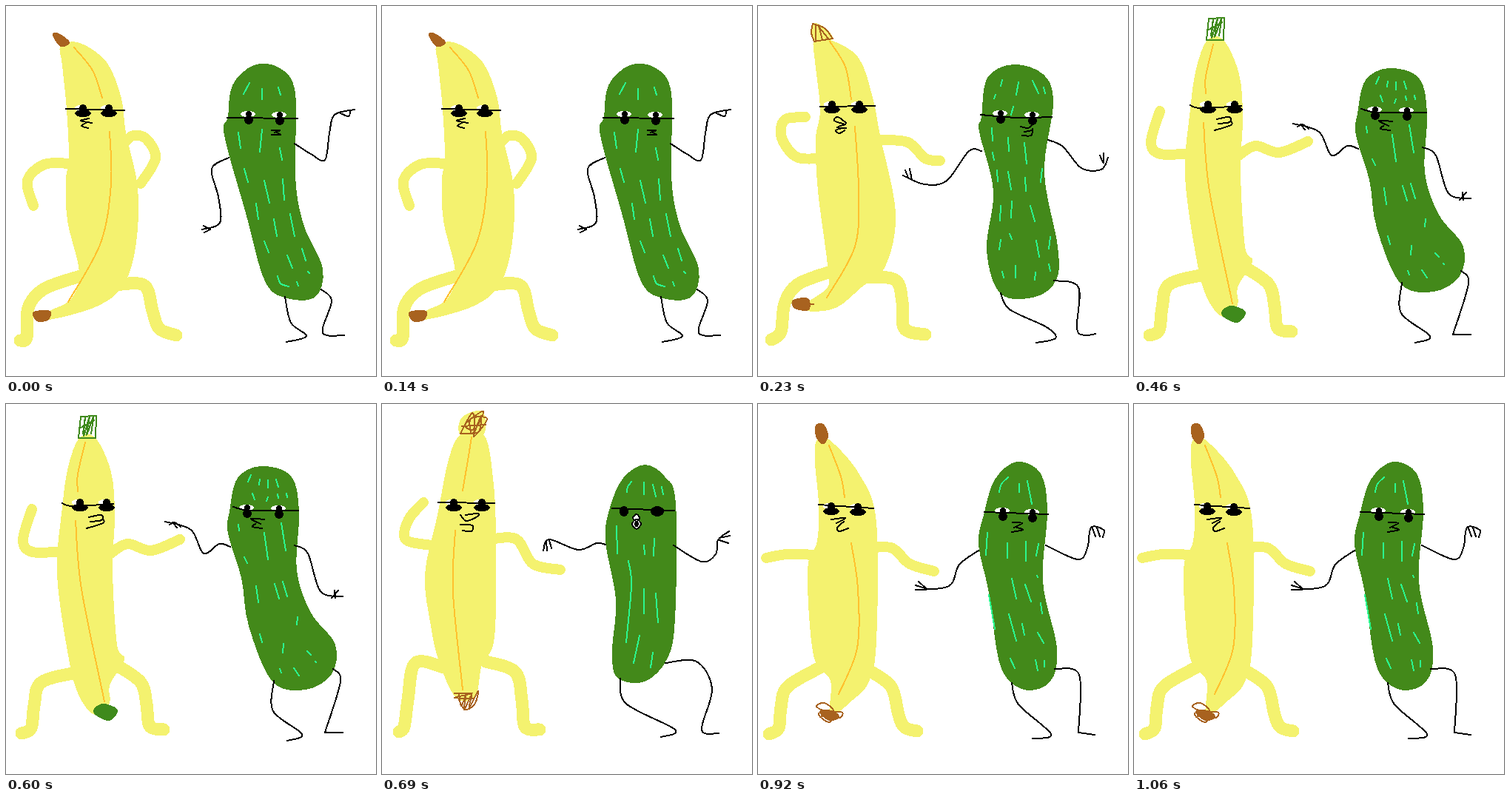
An HTML page that plays this animation: 500x500 px, repeating every 1150 ms.

```html
<!DOCTYPE html>
<html lang="en">
<head>
<meta charset="utf-8">
<title>Banana and cucumber dance</title>
<style>
html, body { margin: 0; width: 100%; height: 100%; overflow: hidden; background: #fff; }
svg { display: block; width: 100%; height: 100%; }
path { fill: none; stroke: #000; stroke-width: 2; stroke-linecap: round; stroke-linejoin: round; }
.banana { fill: #f4f26f; stroke: none; }
.arm, .leg { stroke: #f4f26f; stroke-width: 14; }
.leg { stroke-width: 17; }
.ridge { stroke: #ffc12e; }
.brown { stroke: #a8621f; }
.green { stroke: #3f8a1c; }
.brown.full { fill: #a8621f; }
.green.full { fill: #3f8a1c; }
.cuke { fill: #43891a; stroke: none; }
.seams { stroke: #2bf78e; }
.white { fill: #fff; }
.pose { visibility: hidden; animation: show 1150ms step-end infinite; animation-delay: calc(var(--i) * 230ms - 1150ms); }
@keyframes show { 0% { visibility: visible; } 20%, 100% { visibility: hidden; } }
</style>
</head>
<body>
<svg viewBox="0 0 500 500" shape-rendering="crispEdges">
<defs>
  <g id="sly">
    <ellipse class="white" cx="-4" cy="-4" rx="7" ry="4"/>
    <circle cy="-4" r="5"/>
    <ellipse cy="3" rx="11" ry="5"/>
  </g>
  <g id="cool">
    <ellipse class="white" cx="-1" cy="-6" rx="10" ry="4"/>
    <circle cy="-6" r="4"/>
    <circle cy="2" r="6"/>
  </g>
</defs>

<g class="pose">
  <path class="banana" d="M74 54 100 50 136 76 156 125 162 172 178 245 176 320 160 375 125 405 58 424 58 413 88 396 99 360 83 290 81 235 85 205 82 140 76 80Z"/>
  <path class="arm" d="M88 213 52 214 29 236 37 270"/>
  <path class="arm" d="M160 185 172 175 190 180 202 206 182 240"/>
  <path class="leg" d="M104 364 52 382 30 408 28 448 19 452"/>
  <path class="leg" d="M140 378 186 377 198 412 207 436 230 445"/>
  <path class="ridge" d="M92 56 117 87 130 124M140 170 142 240 128 320 84 400"/>
  <path class="brown full" d="M64 39 71 38 85 49 74 54Z"/>
  <path class="brown full" d="M38 414 59 413 56 424 42 425Z"/>
  <path class="cuke" d="M300 150 306 107 335 80 370 84 391 118 391 230 402 295 428 355 418 393 380 395 350 372 324 280 295 175Z"/>
  <path class="seams" d="M329 104 321 119M346 112 346 126M368 110 371 120M314 171 317 192M346 167 343 197M370 192 373 208M322 220 327 238M349 236 356 266M374 234 376 262"/>
  <path class="seams" d="M338 267 341 288M362 288 366 311M384 281 390 311M349 318 355 333M380 337 387 354M400 328 405 344M367 365 371 375 382 379M393 373 395 378M408 359 410 361"/>
  <use href="#sly" x="104" y="142"/><use href="#sly" x="139" y="142"/>
  <use href="#cool" x="328" y="152"/><use href="#cool" x="370" y="153"/>
  <path d="M81 139 160 141M112 152 101 155 116 158M108 158 102 162 111 165"/>
  <path d="M299 151 394 152M359 168 370 168 363 171M366 171 371 174 359 174"/>
  <path d="M301 205 278 220 287 258 289 293 265 302M267 297 276 302M268 306 276 302"/>
  <path d="M390 186 412 200 431 208 437 172 444 147 471 140M452 145 463 149 465 142"/>
  <path d="M377 393 385 428 406 446 379 454M426 383 440 398 428 435 433 445 457 445"/>
</g>

<g class="pose">
  <path class="banana" d="M76 47 98 46 136 70 155 124 165 175 186 280 172 352 140 380 105 408 66 412 68 400 94 380 94 350 81 250 78 180 84 140 77 75Z"/>
  <path class="arm" d="M84 206 52 204 32 178 36 154 64 150"/>
  <path class="arm" d="M160 181 202 184 226 206 246 209"/>
  <path class="leg" d="M98 359 54 376 36 402 31 440 18 451"/>
  <path class="leg" d="M140 366 185 370 195 400 198 436 226 444"/>
  <path class="banana" d="M74 24 90 29 101 45 76 49Z"/>
  <path class="ridge" d="M97 48 118 82 126 126M131 163 136 250 131 325 93 394"/>
  <path class="brown" d="M74 24 72 36 76 48M76 48 101 44M101 44 90 30 74 24M78 26 78 47M82 26 87 46M82 28 95 44"/>
  <path class="brown full" d="M48 398 67 396 68 410 50 408Z"/>
  <path class="brown" d="M66 404 75 403"/>
  <path class="cuke" d="M302 150 310 97 345 79 385 92 399 130 387 225 405 325 403 370 375 393 328 389 309 330 318 250 299 170Z"/>
  <path class="seams" d="M330 100 328 108M352 103 349 120M371 101 379 118M386 110 388 118M321 120 319 125M345 136 342 147M316 165 317 182M338 178 339 196M360 185 363 213M384 220 382 238M317 198 319 208M323 222 324 237"/>
  <path class="seams" d="M338 224 342 248M361 232 362 250M328 270 327 290M343 264 342 286M368 270 374 291M328 316 326 329M340 308 343 315M376 317 380 339M395 312 393 328M330 359 332 367M348 351 348 367M375 360 374 370M393 349 395 358"/>
  <use href="#sly" x="100" y="137"/><use href="#sly" x="137" y="137"/>
  <use href="#cool" x="328" y="151"/><use href="#cool" x="371" y="153"/>
  <path d="M84 136 158 135M119 158 108 150 103 155 118 160M118 160 107 164 119 165M114 165 105 168 110 172 117 168"/>
  <path d="M301 147 350 151 397 150M355 163 365 165 371 160M360 170 371 168M357 175 369 175 371 166"/>
  <path d="M302 196 285 196 255 236 225 241 196 229M203 232 199 222M208 235 205 220"/>
  <path d="M392 181 412 190 437 219 464 221 473 205M462 202 467 212 467 199"/>
  <path d="M328 388 340 410 390 434 402 449 376 455M400 371 433 380 431 435 441 445 456 443"/>
</g>

<g class="pose">
  <path class="banana" d="M99 46 121 46 142 92 147 150 144 225 150 325 160 345 140 380 140 404 120 420 99 395 85 345 69 230 76 140 84 85Z"/>
  <path class="arm" d="M78 199 36 200 23 184 35 142"/>
  <path class="arm" d="M140 203 164 189 196 198 235 183"/>
  <path class="leg" d="M100 362 48 376 38 408 34 438 21 445"/>
  <path class="leg" d="M148 352 182 376 190 406 194 435 213 440"/>
  <path class="ridge" d="M107 52 97 95 97 118M94 158 102 250 133 402"/>
  <path class="green" d="M98 46 101 17M101 17 122 16M122 16 121 46M121 46 98 46M104 40 107 18 105 43 113 16 109 42 118 17 115 40M101 32 119 22"/>
  <path class="green full" d="M121 411 133 406 150 414 139 427 121 419Z"/>
  <path class="cuke" d="M302 145 313 100 345 84 385 97 396 145 393 225 412 282 445 325 440 365 405 386 360 375 328 300 318 235 300 175Z"/>
  <path class="seams" d="M331 96 327 105M343 102 342 109M354 103 354 113M365 102 368 112M379 121 380 126M333 121 336 129M354 126 352 131M367 122 368 127M314 163 315 171M349 174 354 210M372 161 378 198"/>
  <path class="seams" d="M322 207 326 215M338 246 341 268M363 243 369 263M374 240 380 260M394 288 393 298M343 311 346 322M375 324 374 336M407 334 412 339M370 358 372 363M389 357 396 367M418 348 419 349"/>
  <use href="#sly" x="100" y="137"/><use href="#sly" x="136" y="137"/>
  <use href="#cool" x="326" y="146"/><use href="#cool" x="369" y="147"/>
  <path d="M76 134 90 138 145 135M112 153 129 150 129 157 114 159M109 168 131 161 131 155"/>
  <path d="M307 139 330 144 395 144M349 156 331 155 344 162M337 162 333 166 346 168"/>
  <path d="M303 193 288 189 267 202 250 170 215 159M221 163 228 160 236 166M225 160 231 167"/>
  <path d="M390 191 408 202 425 253 455 260M440 262 449 252M445 262 444 252"/>
  <path d="M362 374 361 415 400 446 380 455M442 358 452 375 431 444M431 444 455 444"/>
</g>

<g class="pose">
  <path class="banana" d="M106 42 138 42 150 100 154 180 152 315 135 352 126 395 100 397 77 348 66 300 58 230 75 150 90 75Z"/>
  <path class="arm" d="M67 191 32 183 36 156 56 133"/>
  <path class="arm" d="M150 182 182 183 204 216 241 224"/>
  <path class="leg" d="M84 356 45 350 35 400 30 436 23 443"/>
  <path class="leg" d="M140 348 180 362 189 400 193 436 213 440"/>
  <path class="banana" d="M108 18 136 10 137 42 106 42Z"/>
  <path class="ridge" d="M121 45 117 70 109 117M99 171 96 255 109 386"/>
  <path class="brown" d="M106 40 122 12 124 34 112 28 137 10 122 40 120 20 142 20 124 44 134 16 130 38 106 40M108 30 140 28"/>
  <path class="brown" d="M98 391 122 391 98 397 124 398M104 392 107 408 113 395 111 413 121 393 118 410 130 388 125 406 112 413 104 400"/>
  <path class="cuke" d="M308 140 326 100 355 82 382 98 397 135 396 290 385 345 355 375 318 370 311 335 316 265 302 185Z"/>
  <path class="seams" d="M337 105 332 112 331 119M354 106 354 122M366 109 370 125M378 112 380 122M317 165 318 202M354 191 355 203M368 182 367 205"/>
  <path class="seams" d="M333 212 337 245 330 322M354 250 354 283M370 256 373 295M348 313 340 350M366 336 363 356"/>
  <use href="#sly" x="97" y="137"/><use href="#sly" x="135" y="137"/>
  <ellipse cx="327" cy="145" rx="6" ry="7"/><ellipse cx="372" cy="145" rx="9" ry="7"/>
  <path d="M76 133 152 134M106 150 114 158 129 152 129 148 113 150M106 163 122 164 121 172 109 171"/>
  <path d="M311 141 395 144"/>
  <path class="white" d="M339 154 344 149 348 154 344 158Z"/>
  <path class="white" d="M338 162 344 156 350 162 344 169Z"/>
  <ellipse cx="344" cy="162" rx="3" ry="4"/>
  <path d="M302 190 290 188 265 197 226 183 218 198M222 186 223 198M226 184 229 195"/>
  <path d="M394 191 432 213 451 203 454 184 469 172M456 181 470 178M456 184 468 188"/>
  <path d="M322 371 330 405 396 440 377 450M383 350 425 348 446 385 432 440 455 445"/>
</g>

<g class="pose">
  <path class="banana" d="M79 50 96 48 137 95 160 160 160 320 150 375 128 400 98 420 98 374 75 340 67 225 80 185 82 135 77 80Z"/>
  <path class="arm" d="M78 204 40 203 11 208"/>
  <path class="arm" d="M155 194 182 195 205 216 238 226"/>
  <path class="leg" d="M84 356 40 382 31 410 28 438 15 446"/>
  <path class="leg" d="M150 360 180 382 190 420 198 437 215 442"/>
  <path class="ridge" d="M96 56 112 98 117 126M126 188 135 250 134 330 109 392"/>
  <path class="brown full" d="M79 29 88 28 94 42 89 53 82 49 78 39Z"/>
  <path class="brown full" d="M84 416 100 415 109 423 96 427Z"/>
  <path class="brown" d="M94 417 79 409 90 404 103 416 96 430 82 418 112 416 110 424 86 422"/>
  <path class="cuke" d="M305 150 320 102 350 78 382 94 391 145 385 240 404 330 395 375 360 386 328 355 312 255 298 190Z"/>
  <path class="seams" d="M338 99 329 108 326 119M353 108 353 119M364 104 370 135M310 174 308 204M337 188 337 208M362 186 362 212M379 189 376 205M343 236 349 263M361 244 369 267M377 232 378 234"/>
  <path class="seams" d="M312 258 320 304M339 284 349 320M357 297 360 312M382 269 384 283M378 309 386 323M341 344 347 357M375 346 378 360M387 347 387 355"/>
  <use href="#sly" x="99" y="142"/><use href="#sly" x="135" y="143"/>
  <use href="#cool" x="331" y="150"/><use href="#cool" x="371" y="152"/>
  <path d="M82 136 156 141M99 156 118 154 106 161M116 159 107 167 110 172 122 168"/>
  <path d="M306 146 392 149M344 160 357 161 346 167M350 167 358 170 343 173"/>
  <path d="M298 198 272 217 258 246 213 251M213 245 226 249M217 240 227 249"/>
  <path d="M389 191 432 210 445 195 450 167 467 170 466 180M452 168 456 179M458 167 462 179"/>
  <path d="M343 377 352 406 396 446 371 452M401 358 434 366 433 444M433 444 455 447"/>
</g>
</svg>
<script>
// Rounds a polyline into a Catmull-Rom curve.
function smooth(line, closed) {
  const v = line.match(/\d+/g).map(Number), n = v.length / 2;
  const at = i => {
    const k = 2 * (closed ? (i + n) % n : Math.max(0, Math.min(n - 1, i)));
    return [v[k], v[k + 1]];
  };
  let d = 'M' + at(0);
  for (let i = 0; i < (closed ? n : n - 1); i++) {
    const [a, b, c, e] = [at(i - 1), at(i), at(i + 1), at(i + 2)];
    const out = b.map((p, k) => p + (c[k] - a[k]) / 6);
    const into = c.map((p, k) => p - (e[k] - b[k]) / 6);
    d += `C${out} ${into} ${c}`;
  }
  return d + (closed ? 'Z' : '');
}

document.querySelectorAll('path').forEach(path => {
  const d = path.getAttribute('d');
  path.setAttribute('d', d.match(/M[^M]+/g).map(s => smooth(s, s.endsWith('Z'))).join(''));
});
document.querySelectorAll('.pose').forEach((pose, i) => pose.style.setProperty('--i', i));
</script>
</body>
</html>
```
